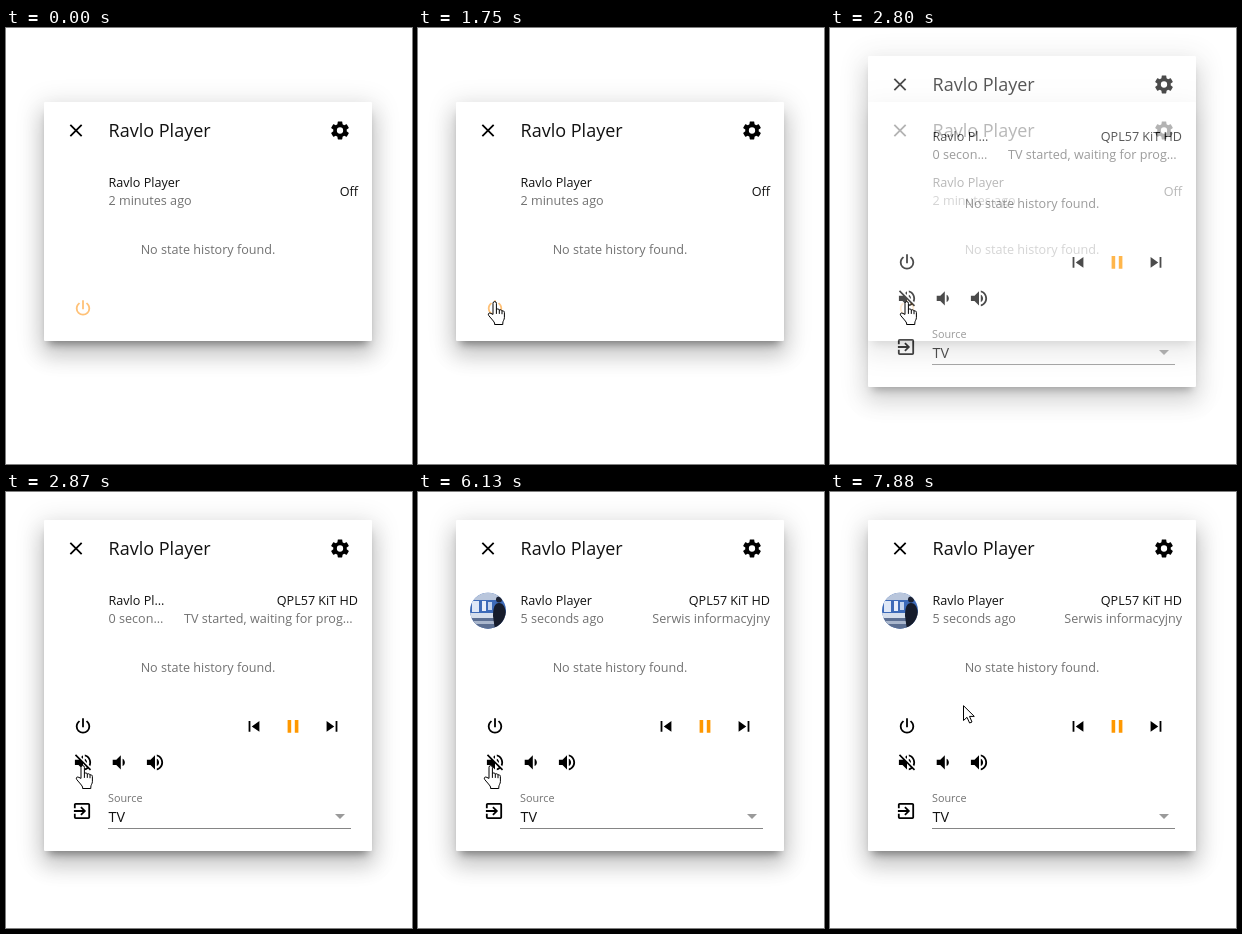
Animation, 406 px wide and 436 px high, one loop 8 s. Source, as an HTML page:

```html
<!DOCTYPE html>
<html lang="en">
<head>
<meta charset="utf-8">
<title>Media player dialog</title>
<style>
  html, body { margin: 0; width: 100%; height: 100%; overflow: hidden; background: #fff; }
  svg { display: block; }
  text { font: 12.6px "Open Sans", "Noto Sans", sans-serif; fill: #111; }
  .title { font-size: 18px; }
  .soft { fill: #727272; }
  .label { font-size: 10.8px; fill: #727272; }
  .value { font-size: 14.4px; }
  .end { text-anchor: end; }
  .mid { text-anchor: middle; }
</style>
</head>
<body>
<svg id="stage" width="406" height="436" viewBox="0 0 406 436">
  <defs>
    <filter id="blur1" x="-30%" y="-30%" width="160%" height="160%"><feGaussianBlur stdDeviation="10.8"/></filter>
    <filter id="blur2" x="-30%" y="-30%" width="160%" height="160%"><feGaussianBlur stdDeviation="13.5"/></filter>
    <filter id="blur3" x="-30%" y="-30%" width="160%" height="160%"><feGaussianBlur stdDeviation="4.5"/></filter>
    <clipPath id="round"><circle cx="70" cy="118.7" r="18"/></clipPath>
  </defs>
  <g id="off"></g>
  <g id="on"></g>
  <g id="hand" fill="#fff" stroke="#000" stroke-linejoin="round" stroke-linecap="round">
    <path d="M6 13V2.3a1.7 1.7 0 0 1 3.4 0V8.3c1-.6 2.6-.4 2.9.7 1-.5 2.4-.2 2.7.9 1.2-.4 2.4.3 2.4 1.6v5.2c0 2-1.6 3.3-1.6 5.3v1.5H7.6V22C6.5 19.6 3 16.4 1.6 14.3.6 12.7 2.2 11.3 3.6 12.2Z"/>
    <path fill="none" d="M9.4 8.5v4M12.3 9.3v3.2M15 10.2v2.6"/>
  </g>
  <path id="arrow" fill="#fff" stroke="#000" d="M.5.7V15.5L4 12.3 6.6 18 9 17 6.5 11.4H11.3Z"/>
</svg>
<script>
const LOOP = 8000;
const $ = id => document.getElementById(id);
const off = $("off"), on = $("on");

const icons = {
  close: "M19 6.41 17.59 5 12 10.59 6.41 5 5 6.41 10.59 12 5 17.59 6.41 19 12 13.41 17.59 19 19 17.59 13.41 12Z",
  gear: "M12,15.5A3.5,3.5 0 0,1 8.5,12A3.5,3.5 0 0,1 12,8.5A3.5,3.5 0 0,1 15.5,12A3.5,3.5 0 0,1 12,15.5M19.43,12.97C19.47,12.65 19.5,12.33 19.5,12C19.5,11.67 19.47,11.34 19.43,11L21.54,9.37C21.73,9.22 21.78,8.95 21.66,8.73L19.66,5.27C19.54,5.05 19.27,4.96 19.05,5.05L16.56,6.05C16.04,5.66 15.5,5.32 14.87,5.07L14.5,2.42C14.46,2.18 14.25,2 14,2H10C9.75,2 9.54,2.18 9.5,2.42L9.13,5.07C8.5,5.32 7.96,5.66 7.44,6.05L4.95,5.05C4.73,4.96 4.46,5.05 4.34,5.27L2.34,8.73C2.21,8.95 2.27,9.22 2.46,9.37L4.57,11C4.53,11.34 4.5,11.67 4.5,12C4.5,12.33 4.53,12.65 4.57,12.97L2.46,14.63C2.27,14.78 2.21,15.05 2.34,15.27L4.34,18.73C4.46,18.95 4.73,19.03 4.95,18.95L7.44,17.94C7.96,18.34 8.5,18.68 9.13,18.93L9.5,21.58C9.54,21.82 9.75,22 10,22H14C14.25,22 14.46,21.82 14.5,21.58L14.87,18.93C15.5,18.67 16.04,18.34 16.56,17.94L19.05,18.95C19.27,19.03 19.54,18.95 19.66,18.73L21.66,15.27C21.78,15.05 21.73,14.78 21.54,14.63Z",
  power: "M16.56,5.44L15.11,6.89C16.84,7.94 18,9.83 18,12A6,6 0 0,1 6,12C6,9.83 7.16,7.94 8.88,6.88L7.44,5.44C5.36,6.88 4,9.28 4,12A8,8 0 0,0 20,12C20,9.28 18.64,6.88 16.56,5.44M13,3H11V13H13Z",
  mute: "M12,4L9.91,6.09L12,8.18M4.27,3L3,4.27L7.73,9H3V15H7L12,20V13.27L16.25,17.53C15.58,18.04 14.83,18.46 14,18.7V20.77C15.38,20.45 16.63,19.82 17.68,18.96L19.73,21L21,19.73L12,10.73M19,12C19,12.94 18.8,13.82 18.46,14.64L19.97,16.15C20.62,14.91 21,13.5 21,12C21,7.72 18,4.14 14,3.23V5.29C16.89,6.15 19,8.83 19,12M16.5,12C16.5,10.23 15.5,8.71 14,7.97V10.18L16.45,12.63C16.5,12.43 16.5,12.21 16.5,12Z",
  quiet: "M5,9V15H9L14,20V4L9,9M18.5,12C18.5,10.23 17.5,8.71 16,7.97V16C17.5,15.29 18.5,13.76 18.5,12Z",
  loud: "M14,3.23V5.29C16.89,6.15 19,8.83 19,12C19,15.17 16.89,17.84 14,18.7V20.77C18,19.86 21,16.28 21,12C21,7.72 18,4.14 14,3.23M16.5,12C16.5,10.23 15.5,8.71 14,7.97V16C15.5,15.29 16.5,13.76 16.5,12M3,9V15H7L12,20V4L7,9H3Z",
  prev: "M6,18V6H8V18H6M9.5,12L18,6V18L9.5,12Z",
  next: "M16,18H18V6H16M6,18L14.5,12L6,6V18Z",
  pause: "M14,19H18V5H14M6,19H10V5H6V19Z",
  input: "M19,3H5C3.89,3 3,3.89 3,5V9H5V5H19V19H5V15H3V19A2,2 0 0,0 5,21H19A2,2 0 0,0 21,19V5C21,3.89 20.1,3 19,3M10.08,15.58L11.5,17L16.5,12L11.5,7L10.08,8.41L12.67,11H3V13H12.67L10.08,15.58Z"
};

function add(parent, tag, attrs, text) {
  const el = document.createElementNS("http://www.w3.org/2000/svg", tag);
  for (const key in attrs) el.setAttribute(key, attrs[key]);
  if (text) el.textContent = text;
  parent.append(el);
  return el;
}
const rect = (g, x, y, width, height, fill, more) => add(g, "rect", { x, y, width, height, fill, ...more });
const label = (g, x, y, text, cls = "") => add(g, "text", { x, y, class: cls }, text);
const icon = (g, name, x, y, fill = "#000") =>
  add(g, "path", { d: icons[name], fill, transform: `translate(${x} ${y}) scale(.9) translate(-12 -12)` });

// Page, dialog with its three shadows, and header
function dialog(g, top, height) {
  rect(g, 0, 0, 406, 436, "#fff");
  const shadow = (dy, spread, alpha, blur) =>
    rect(g, 38 - spread, top + dy - spread, 328 + 2 * spread, height + 2 * spread, "#000",
      { opacity: alpha, filter: `url(#${blur})` });
  shadow(14.4, 1.8, .14, "blur1");
  shadow(5.4, 4.5, .12, "blur2");
  shadow(7.2, -4.5, .4, "blur3");
  rect(g, 38, top, 328, height, "#fff", { rx: 1 });
  icon(g, "close", 70, top + 28.5);
  icon(g, "gear", 334, top + 28.5);
  label(g, 102.5, top + 35, "Ravlo Player", "title");
  label(g, 202, top + 152, "No state history found.", "soft mid");
}

dialog(off, 74, 239);
label(off, 102.5, 159, "Ravlo Player");
label(off, 102.5, 177, "2 minutes ago", "soft");
label(off, 352, 168, "Off", "end");
const ripple = add(off, "circle", { cx: 77, cy: 280, fill: "#ff9800", opacity: .18 });
icon(off, "power", 77, 280.4, "#ffc177");

dialog(on, 28, 331);
const name = label(on, 102.5, 113, "Ravlo Player");
const age = label(on, 102.5, 131, "", "soft");
label(on, 352, 113, "QPL57 KiT HD", "end");
const waiting = label(on, 178, 131, "TV started, waiting for prog…", "soft");
const programme = label(on, 352, 131, "Serwis informacyjny", "soft end");
icon(on, "power", 77, 234.4);
icon(on, "prev", 248, 234.4);
icon(on, "pause", 287, 234.4, "#ff9800");
icon(on, "next", 326, 234.4);
icon(on, "mute", 77, 270.4);
icon(on, "quiet", 113, 270.4);
icon(on, "loud", 149, 270.4);
icon(on, "input", 76, 319);
label(on, 102, 310, "Source", "label");
label(on, 102.5, 330, "TV", "value");
rect(on, 102, 336, 243, 1, "#858585");
add(on, "path", { d: "M329 322h10l-5 5Z", fill: "#9a9a9a" });

// Thumbnail: studio with a plain dark figure
const photo = add(on, "g", { "clip-path": "url(#round)" });
rect(photo, 52, 100, 36, 38, "#3d6ab8");
rect(photo, 52, 100, 36, 8, "#b9c6dc");
rect(photo, 54, 109, 7, 11, "#dfe8f7");
rect(photo, 64, 109, 4, 10, "#e8eefa");
rect(photo, 70, 110, 4, 8, "#c3d3ee");
rect(photo, 52, 121, 36, 5, "#d5deec");
rect(photo, 52, 126, 36, 12, "#5c6f92");
rect(photo, 52, 129, 24, 3, "#a9b6cc");
add(photo, "circle", { cx: 81, cy: 107.5, r: 3, fill: "#1c2233" });
add(photo, "path", { d: "M75 124c0-9 2-13 6-13s7 4 7 13v14H77Z", fill: "#161c2c" });

// Pointer stops: time, x, y, 1 for hand or 0 for arrow
const stops = [
  [330, 69, 273, 1], [6130, 65, 273, 1],
  [6460, 71, 271, 1], [6570, 91, 266, 1], [6680, 122, 257, 1], [6790, 163, 246, 0],
  [6900, 202, 234, 0], [7010, 231, 225, 1], [7110, 239, 233, 1], [7230, 243, 233, 1],
  [7350, 249, 232, 1], [7460, 241, 229, 1], [7560, 212, 224, 0], [7670, 176, 218, 0],
  [7770, 146, 214, 0], [7880, 133, 213, 0]
];

const show = (el, visible) => el.setAttribute("visibility", visible ? "visible" : "hidden");

function draw(t) {
  on.setAttribute("opacity", t < 2730 ? 0 : t < 2800 ? .35 : t < 2870 ? .7 : 1);
  show(ripple, t >= 1440 && t < 1750);
  ripple.setAttribute("r", t < 1540 ? 12 : 18);

  const loaded = t >= 4810;
  name.textContent = loaded ? "Ravlo Player" : "Ravlo Pl…";
  age.textContent = (t < 4500 ? "0" : "5") + (loaded ? " seconds ago" : " secon…");
  show(waiting, !loaded);
  show(programme, loaded);
  show(photo, loaded);

  const stop = stops.filter(s => s[0] <= t).pop();
  show($("hand"), stop && stop[3]);
  show($("arrow"), stop && !stop[3]);
  if (stop) {
    const pointer = $(stop[3] ? "hand" : "arrow");
    pointer.setAttribute("transform", `translate(${stop[1]} ${stop[2]})`);
  }
}

const start = performance.now();
function tick() {
  draw((performance.now() - start) % LOOP);
  requestAnimationFrame(tick);
}
tick();
</script>
</body>
</html>
```
